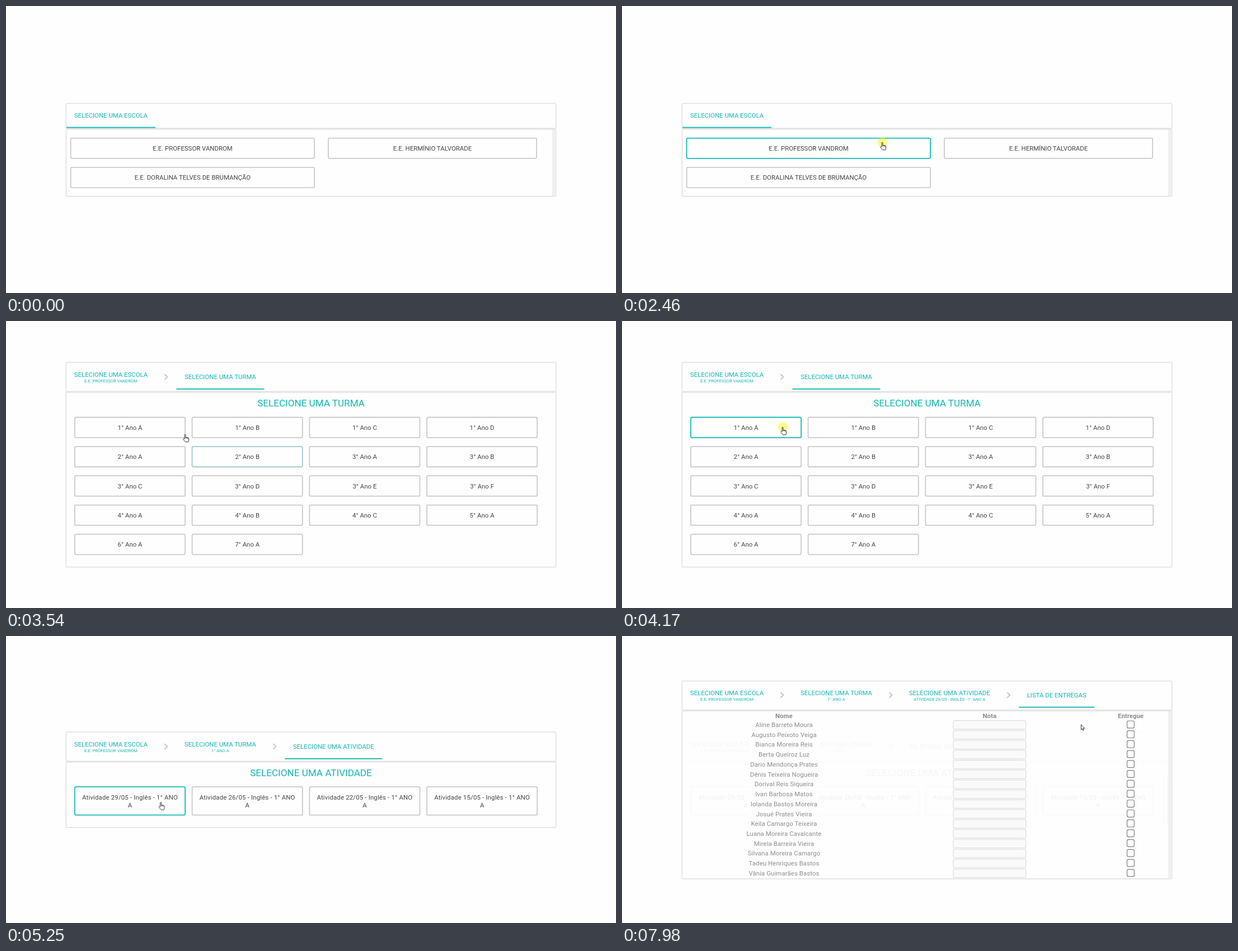
An HTML page for the animation above (8 s loop, 1090 by 514 pixels).

```html
<!DOCTYPE html>
<html lang="pt-BR">
<head>
<meta charset="utf-8">
<title>Lista de entregas</title>
<style>
html, body { margin: 0; width: 100%; height: 100%; overflow: hidden; background: #fefefe; }
svg { display: block; }
text { font: 11.4px Roboto, "Noto Sans", sans-serif; text-anchor: middle; fill: #444; }
.teal { fill: #14b7b3; }
.small { font-size: 7.6px; }
.title { font-size: 17.1px; }
.task { letter-spacing: .17px; }
.name { letter-spacing: .1px; fill: #8d8d8d; }
.th { font-weight: 700; fill: #8d8d8d; }
.panel { fill: none; stroke: #e4e4e4; stroke-width: 1.8; }
.btn { fill: #fff; fill-opacity: .5; stroke: #cacaca; stroke-width: 1.8; }
.chev { fill: none; stroke: #bdbdbd; stroke-width: 1.7; }
.bar { fill: #f0f0f0; }
.field { fill: #fafafa; stroke: #d6d6d6; }
.check { fill: #fff; stroke: #808080; stroke-width: 1.2; }
.ghost { opacity: .07; filter: grayscale(1); }
.cover { fill: #fefefe; }

.screen, .icon { visibility: hidden; animation: 8s step-end infinite; }
#school { animation-name: school; }
#grade { animation-name: grade; }
#task { animation-name: task; }
#list { animation-name: list; }
@keyframes school { 0% { visibility: visible } 33%, 100% { visibility: hidden } }
@keyframes grade { 33% { visibility: visible } 54%, 100% { visibility: hidden } }
@keyframes task { 54% { visibility: visible } 72.375%, 100% { visibility: hidden } }
@keyframes list { 72.375%, 100% { visibility: visible } }

#rows { animation: rows 8s step-end infinite; }
@keyframes rows { 0%, 72.375% { opacity: .4 } 73.5%, 100% { opacity: 1 } }

.h1, .h2, .h3, .h4 { animation: 8s linear infinite; }
.h1 { animation-name: hover1; }
.h2 { animation-name: hover2; }
.h3 { animation-name: hover3; }
.h4 { animation-name: hover4; }
@keyframes hover1 { 0%, 7.2% { stroke: #cacaca } 10%, 100% { stroke: #14bcb8 } }
@keyframes hover2 {
  0%, 33% { stroke: #cacaca } 36%, 42.4% { stroke: #14bcb8 } 44.8%, 100% { stroke: #cacaca }
}
@keyframes hover3 { 0%, 45.25% { stroke: #cacaca } 49.25%, 100% { stroke: #14bcb8 } }
@keyframes hover4 { 0%, 63.7% { stroke: #cacaca } 65.625%, 100% { stroke: #14bcb8 } }

#cursor { animation: move 8s step-end infinite; }
@keyframes move {
  0% { transform: translate(965px, 485px) }
  2.25% { transform: translate(965px, 485px); animation-timing-function: steps(4, end) }
  6.125% { transform: translate(589px, 303px); animation-timing-function: steps(4, end) }
  10% { transform: translate(465px, 244px) }
  40.625% { transform: translate(465px, 244px); animation-timing-function: steps(4, jump-both) }
  44.25% { transform: translate(320px, 203px); animation-timing-function: steps(5, end) }
  49.25% { transform: translate(287px, 190px) }
  58% { transform: translate(291px, 198px) }
  59.875% { transform: translate(291px, 198px); animation-timing-function: steps(6, jump-both) }
  65.625% { transform: translate(276.5px, 297.5px) }
  91.875% { transform: translate(276.5px, 297.5px); animation-timing-function: steps(8, jump-both) }
  99.75%, 100% { transform: translate(820px, 158px) }
}
#arrow { animation-name: arrow; }
#hand { animation-name: hand; }
#beam { animation-name: beam; }
#ring { animation-name: ring; fill: #ff0; fill-opacity: .47; }
@keyframes arrow {
  0% { visibility: hidden } 2.25% { visibility: visible } 7.1% { visibility: hidden }
  54% { visibility: visible } 63.7% { visibility: hidden } 92.8%, 100% { visibility: visible }
}
@keyframes hand {
  0% { visibility: hidden } 7.1% { visibility: visible } 54% { visibility: hidden }
  63.7% { visibility: visible } 72.375%, 100% { visibility: hidden }
}
@keyframes beam { 72.375% { visibility: visible } 92.8%, 100% { visibility: hidden } }
@keyframes ring {
  0% { visibility: hidden } 30.75% { visibility: visible } 33% { visibility: hidden }
  52.125% { visibility: visible } 54% { visibility: hidden }
  70.5% { visibility: visible } 72.375%, 100% { visibility: hidden }
}
.icon path { fill: #fff; stroke: #333; stroke-width: 1; stroke-linejoin: round; }
#beam path { fill: none; }
</style>
</head>
<body>
<svg id="stage" width="1090" height="514" viewBox="0 0 1090 514"></svg>
<script>
const schools = ["E.E. PROFESSOR VANDROM", "E.E. HERMÍNIO TALVORADE", "E.E. DORALINA TELVES DE BRUMANÇÃO"];
const grades = "1A 1B 1C 1D 2A 2B 3A 3B 3C 3D 3E 3F 4A 4B 4C 5A 6A 7A".split(" ");
const days = [29, 26, 22, 15];
const students = [
  "Aline Barreto Moura", "Augusto Peixoto Veiga", "Bianca Moreira Reis", "Berta Queiroz Luz",
  "Dario Mendonça Prates", "Dênis Teixeira Nogueira", "Dorival Reis Siqueira", "Ivan Barbosa Matos",
  "Iolanda Bastos Moreira", "Josué Prates Vieira", "Keila Camargo Teixeira", "Luana Moreira Cavalcante",
  "Mirela Barreira Vieira", "Silvana Moreira Camargo", "Tadeu Henriques Bastos", "Vânia Guimarães Bastos"
];
// label, centre, half width of the underline, choice shown below
const tabs = [
  ["SELECIONE UMA ESCOLA", 187.5, 79.5, schools[0]],
  ["SELECIONE UMA TURMA", 383, 78.5, "1° ANO A"],
  ["SELECIONE UMA ATIVIDADE", 585.3, 87, "ATIVIDADE 29/05 - INGLÊS - 1° ANO A"],
  ["LISTA DE ENTREGAS", 776.7, 67.5]
];
const chevrons = [286, 480, 690.7];

// y is the middle of the capitals
const text = (x, y, str, cls = "", size = 11.4) =>
  `<text class="${cls}" x="${x}" y="${y + size * .355}">${str}</text>`;
const small = (x, y, str) => text(x, y, str, "teal small", 7.6);
const title = (y, str) => text(545, y, str, "teal title", 17.1);
const rect = (cls, x, y, w, h, r = 0) =>
  `<rect class="${cls}" x="${x}" y="${y}" width="${w}" height="${h}" rx="${r}"/>`;
const box = (cls, x, y, w, h) => rect(cls, x + .9, y + .9, w - 1.8, h - 1.8, 2.2);
const panels = (top, mid, end) =>
  box("panel", 106.5, top, 877.2, mid - top) + box("panel", 106.5, mid - .4, 877.2, end - mid + .4);
const underline = ([, x, half], y) => rect("teal", x - half, y - 1, half * 2, 1.9);
const screen = (id, body) => `<g id="${id}" class="screen">${body}</g>`;

function steps(y, count, line = true) {
  let out = "";
  tabs.slice(0, count).forEach((tab, i) => {
    const [label, x, , choice] = tab;
    if (i < count - 1) {
      const c = chevrons[i];
      out += text(x, y - 4, label, "teal") + small(x, y + 7.8, choice) +
        `<path class="chev" d="M${c - 2.6} ${y - 4.8}l5 4.8-5 4.8"/>`;
    } else {
      out += text(x, y, label, "teal") + (line ? underline(tab, y + 21.8) : "");
    }
  });
  return out;
}

const column = i => 122 + 209.7 * i;

const schoolView = panels(173.5, 220, 341.8) + text(187.5, 196, tabs[0][0], "teal") +
  underline(tabs[0], 217.6) + rect("bar", 975.8, 221.5, 7, 118.5) +
  box("btn h1", 114.7, 235.7, 437.3, 38) + text(333.5, 255, schools[0]) +
  box("btn", 575, 235.7, 374, 38) + text(762, 255, schools[1]) +
  box("btn", 114.7, 288.2, 437.3, 38) + text(333.5, 307, schools[2]);

const gradeView = panels(73.3, 127.2, 441.6) + steps(100, 2) + title(147, tabs[1][0]) +
  grades.map((g, i) => {
    const x = column(i % 4), y = 171.6 + 52.35 * (i >> 2);
    const cls = g === "2B" ? "btn h2" : g === "1A" ? "btn h3" : "btn";
    return box(cls, x, y, 199, 38.2) + text(x + 99.5, y + 19.2, `${g[0]}° Ano ${g[1]}`);
  }).join("");

const taskView = (live) => panels(171.3, 225.2, 344) + steps(198, 3, live) + title(245, tabs[2][0]) +
  days.map((d, i) => {
    const x = column(i), mid = x + 99.5;
    return box(live && !i ? "btn h4" : "btn", x, 269.3, 199, 52.2) +
      text(mid, 289, `Atividade ${d}/05 - Inglês - 1° ANO`, "task") + text(mid, 302.5, "A");
  }).join("");

const listView = `<g class="ghost">${taskView(false)}${rect("chev", 968, 254, 7, 82)}</g>` +
  rect("cover", 228, 136, 124, 298) + rect("cover", 590, 136, 134, 298) +
  panels(79.7, 133.6, 435.8) + steps(105.8, 4) + rect("bar", 975.8, 135.2, 7, 299) +
  `<g id="rows">` + text(289.3, 143, "Nome", "th") + text(656.8, 143, "Nota", "th") +
  text(909, 143, "Entregue", "th") +
  students.map((s, i) => {
    const y = 159 + 17.72 * i;
    return text(289.5, y, s, "name") + rect("field", 592, y - 7.5, 129.6, 15.4, 1.5) +
      rect("check", 902.5, y - 7, 12.8, 12.8, 2.6);
  }).join("") + `</g>`;

const cursor = `<g id="cursor">
  <circle id="ring" class="icon" r="8.6"/>
  <g id="arrow" class="icon"><path d="M.4.6V9.8L2.4 8 3.8 11.1 5.2 10.5 3.9 7.4H6.6Z"/></g>
  <g id="hand" class="icon"><path d="M-.9 8.4V1a.95.95 0 0 1 1.9 0V5.2L5 6q1.5.3 1.5 1.8V10.2q0 1.9-1 3.5H.6L-2.9 9.3q-.8-1.4.5-1.8Q-1.6 7.4-.9 8.4ZM1 5.2V7.4M3 5.8V7.6M5 6.2V7.8"/></g>
  <g id="beam" class="icon"><path d="M-.7-4.8H3.3M1.3-4.8V4.9M-.7 4.9H3.3"/></g>
</g>`;

document.getElementById("stage").innerHTML =
  screen("school", schoolView) + screen("grade", gradeView) +
  screen("task", taskView(true)) + screen("list", listView) + cursor;
</script>
</body>
</html>
```
